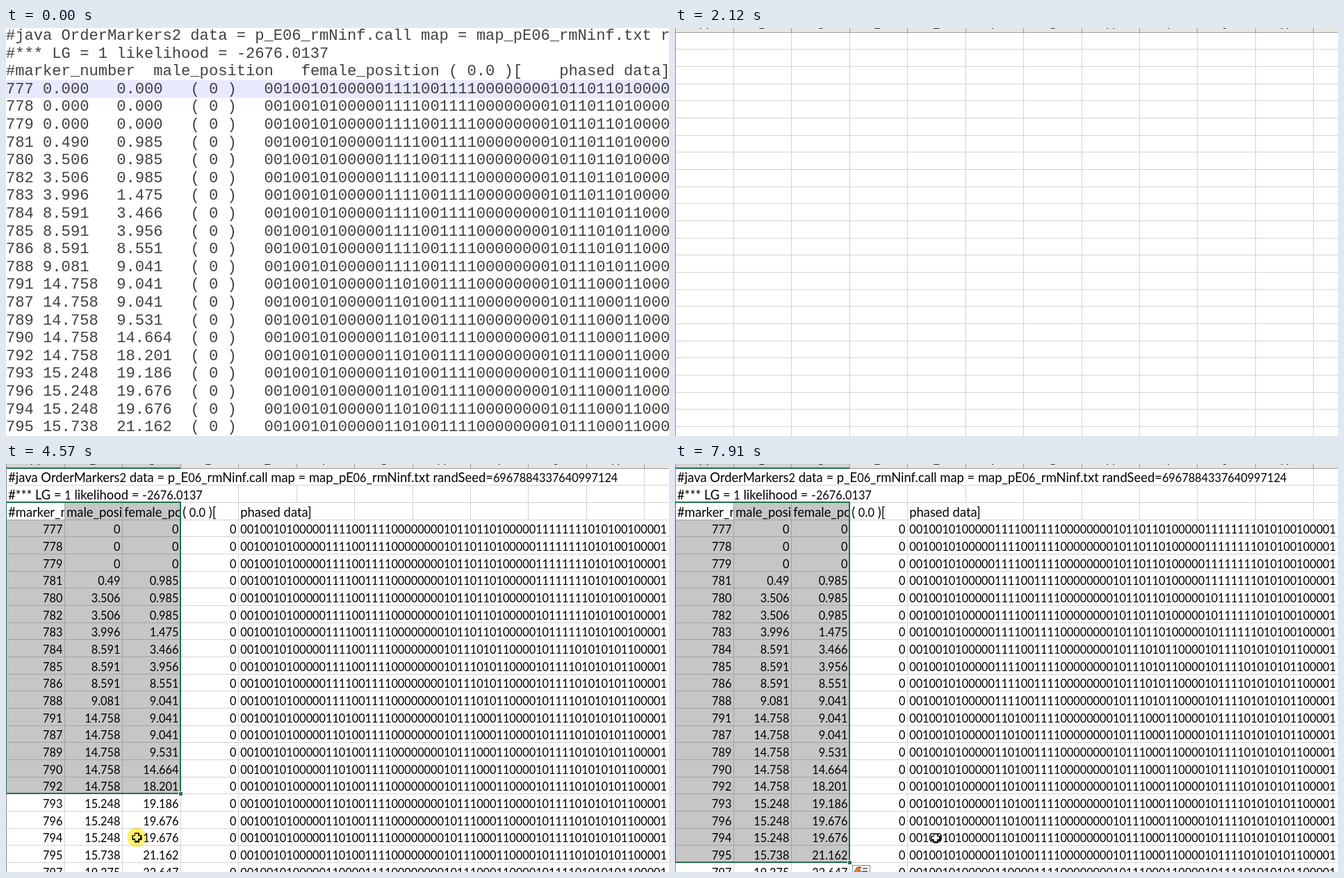
An HTML page with a canvas that plays this animation: 954x587 px, repeating every 7990 ms.

```html
<!DOCTYPE html>
<html>
<head>
<meta charset="utf-8">
<style>
html, body { margin: 0; width: 100%; height: 100%; overflow: hidden; background: #fff; }
canvas { display: block; }
</style>
</head>
<body>
<canvas id="stage" width="954" height="587"></canvas>
<script>
const W = 954, H = 587, LOOP = 7990;
const ctx = document.getElementById('stage').getContext('2d');

const COMMAND = '#java OrderMarkers2 data = p_E06_rmNinf.call map = map_pE06_rmNinf.txt randSeed=6967884337640997124';
const LIKELIHOOD = '#*** LG = 1 likelihood = -2676.0137';
const ROW_COUNT = 21;

// ---- Linkage map: ascending markers, a few of them placed early ----
const markers = Array.from({ length: ROW_COUNT }, (_, i) => 777 + i);
function placeBefore(marker, next) {
  markers.splice(markers.indexOf(marker), 1);
  markers.splice(markers.indexOf(next), 0, marker);
}
placeBefore(781, 780);
placeBefore(788, 787);
placeBefore(791, 787);
placeBefore(796, 794);

// Positions add up: one crossover at each unit row, a longer gap at the others
const CROSSOVER = 0.49;
function positions(unitRows, gaps) {
  let sum = 0;
  return markers.map((_, i) => sum += unitRows.includes(i) ? CROSSOVER : gaps[i] || 0);
}
const male = positions([3, 6, 10, 16, 19], { 4: 3.016, 7: 4.595, 11: 5.677, 20: 3.537 });
const female = positions([6, 8, 10, 13, 17],
  { 3: 0.985, 7: 1.991, 9: 4.595, 14: 5.133, 15: 3.537, 16: 0.985, 19: 1.486, 20: 1.485 });

function phase(i) {
  const head = '0010010100000' + (i < 11 ? '1111' : i < 20 ? '1101' : '1100') + '00111100000000';
  const middle = i < 7 ? '1011011010000' : i < 11 ? '1011101011000' : '1011100011000';
  const tail = i < 4 ? '011111111010100100001'
    : i < 7 ? '010111111010100100001' : '010111101010101100001';
  return head + middle + tail;
}

// ---- Helpers ----
// Linear interpolation over [time, x, y] points
function track(points, t) {
  const next = points.findIndex(p => t < p[0]);
  if (next <= 0) return points[next ? points.length - 1 : 0].slice(1);
  const [t0, x0, y0] = points[next - 1], [t1, x1, y1] = points[next];
  const k = (t - t0) / (t1 - t0);
  return [x0 + (x1 - x0) * k, y0 + (y1 - y0) * k];
}

function box(color, x, y, w, h) {
  ctx.fillStyle = color;
  ctx.fillRect(x, y, w, h);
}

function polygon(points, fill, stroke) {
  ctx.beginPath();
  points.forEach(([x, y]) => ctx.lineTo(x, y));
  ctx.closePath();
  ctx.fillStyle = fill;
  ctx.fill();
  ctx.strokeStyle = stroke;
  ctx.lineWidth = 1;
  ctx.stroke();
}

function multiply(color, shape) {
  ctx.save();
  ctx.globalCompositeOperation = 'multiply';
  ctx.fillStyle = color;
  ctx.beginPath();
  shape();
  ctx.fill('evenodd');
  ctx.restore();
}

// ---- Text editor ----
const CHAR = 13.27, LINE = 25.6;
const lineTop = i => Math.round(LINE * i - 2);

function mono(text, column, line) {
  ctx.fillText(text, column * CHAR, LINE * line + 17);
}

function drawArrow(x, y) {
  const shape = [[0, 0], [0, 16], [4, 13], [6, 18], [9, 17], [6, 12], [11, 11]];
  polygon(shape.map(([dx, dy]) => [x + dx, y + dy]), '#fff', '#222');
}

function drawEditor(t) {
  const selected = t >= 70;
  box(selected ? '#c0c0c0' : '#fff', 0, 0, W, H);
  if (selected) box('#fff', 477, lineTop(1), W, LINE - 1);
  else box('#e8e8ff', 0, lineTop(3), W, LINE);

  // a soft black stands in for thin strokes
  ctx.fillStyle = selected ? '#303030' : '#404040';
  ctx.textAlign = 'left';
  ctx.font = '22.11px "Liberation Mono", monospace';
  mono(COMMAND.slice(0, 73), 0, 0);
  mono(LIKELIHOOD, 0, 1);
  mono('#marker_number  male_position', 0, 2);
  mono('female_position ( 0.0 )[', 32, 2);
  mono('phased data]', 60, 2);
  markers.slice(0, -1).forEach((marker, i) => {
    mono(marker, 0, i + 3);
    mono(male[i].toFixed(3), 4, i + 3);
    mono(female[i].toFixed(3), 12, i + 3);
    mono('( 0 )', 20, i + 3);
    mono(phase(i).slice(0, 44), 28, i + 3);
  });
  if (selected && t < 1810) drawArrow(...track([[1100, 615, 442], [1660, 842, 586]], t));
}

// ---- Spreadsheet ----
const GREEN = '#217346', COL = 83.43, ROW = 24.66, TOP = 5.74;
const CLICK = 3150, PASTE = 3640, DRAG = 3720, RELEASE = 6400, LAG = 110;
const colX = i => i ? Math.round(0.55 + COL * i) : 0;
const rowY = i => Math.round(TOP + ROW * i);

const POINTER = [
  [2250, 700, 600], [2870, 80, 45], [3140, 42, 20], [3490, 40, 22], [3640, 46, 68],
  [3740, 158, 78], [3810, 160, 85], [4570, 188, 537], [4720, 193, 549], [5570, 194, 549],
  [5850, 193, 580], [6350, 186, 552], [7220, 173, 530], [7380, 350, 537]
];

const LETTERS = '18.4px Lato, sans-serif', DIGITS = '16.3px Lato, sans-serif';

// Digits are set smaller than letters
function label(text, x, y) {
  for (const run of text.match(/\d+|\D+/g)) {
    ctx.font = /\d/.test(run) ? DIGITS : LETTERS;
    ctx.fillText(run, x, y);
    x += ctx.measureText(run).width;
  }
}

function cellText(text, col, row, span = 1) {
  ctx.save();
  ctx.beginPath();
  ctx.rect(colX(col), rowY(row), colX(col + span) - colX(col), ROW);
  ctx.clip();
  label(text, colX(col) + 3.2, rowY(row + 1) - 4.4);
  ctx.restore();
}

function cellNumber(value, col, row) {
  ctx.font = DIGITS;
  ctx.textAlign = 'right';
  ctx.fillText(Number(value.toFixed(3)), colX(col + 1) - 2.6, rowY(row + 1) - 4.4);
  ctx.textAlign = 'left';
}

// Hides the column lines under text that spills over
function spill(row, from, to) {
  box('#fff', colX(from) + 1, rowY(row) + 1, colX(to) - colX(from) - 1, rowY(row + 1) - rowY(row) - 1);
}

// The dragged range ends at the cell the pointer was over a moment ago
function selectionAt(t) {
  if (t < CLICK) return null;
  if (t < PASTE) return { first: 0, cols: 1, end: 1 };
  if (t < DRAG) return { first: 0, cols: 13, end: 26 };
  const [x, y] = track(POINTER, Math.min(t, RELEASE) - LAG);
  return { first: 2, cols: Math.ceil(x / COL), end: Math.max(3, Math.ceil((y - TOP) / ROW)) };
}

function shadeSelection({ first, cols, end }) {
  const top = rowY(first);
  multiply('#c6c6c6', () => {
    ctx.rect(0, top, colX(cols), rowY(end) - top);
    ctx.rect(0, top, colX(1), rowY(first + 1) - top);
  });
}

function outlineSelection({ first, cols, end }) {
  const top = rowY(first), right = colX(cols), bottom = rowY(end);
  ctx.strokeStyle = GREEN;
  ctx.lineWidth = 2;
  ctx.strokeRect(0, top, right, bottom - top);
  box('#fff', right - 3, bottom - 3, 7, 7);
  box(GREEN, right - 2, bottom - 2, 5, 5);
}

function drawHeader(selection) {
  const marked = selection ? colX(selection.cols) : 0;
  box('#e6e6e6', 0, 0, W, 6);
  box('#d2d2d2', 0, 0, marked, 6);
  box('#9b9b9b', 0, 6, W, 1);
  ctx.font = LETTERS;
  ctx.textAlign = 'center';
  for (let i = 0; i < 12; i++) {
    box('#9b9b9b', colX(i), 0, 1, 6);
    ctx.fillStyle = '#222';
    ctx.fillText(String.fromCharCode(65 + i), colX(i) + COL / 2, 1);
  }
  ctx.textAlign = 'left';
  box(GREEN, 0, 5, marked, 2);
}

function clearSpills() {
  spill(0, 0, 11);
  spill(1, 0, 4);
  spill(2, 4, 6);
  markers.forEach((_, i) => spill(i + 3, 4, 12));
}

function drawData() {
  ctx.fillStyle = '#000';
  cellText(COMMAND, 0, 0, 12);
  cellText(LIKELIHOOD, 0, 1, 4);
  ['#marker_number', 'male_position', 'female_position', '( 0.0 )['].forEach((text, col) => cellText(text, col, 2));
  cellText('phased data]', 4, 2, 2);
  markers.forEach((marker, i) => {
    [marker, male[i], female[i], 0].forEach((value, col) => cellNumber(value, col, i + 3));
    cellText(phase(i), 4, i + 3, 9);
  });
}

function plus(color, x, y, reach, arm) {
  box(color, x - reach, y - arm, 2 * reach, 2 * arm);
  box(color, x - arm, y - reach, 2 * arm, 2 * reach);
}

function drawCross(x, y, pressed) {
  plus('#000', x + 0.5, y + 0.5, 7, 3.5);
  plus('#fff', x, y, 5, 2);
  if (pressed) multiply('#fff26c', () => ctx.arc(x, y, 14, 0, 7));
}

function drawQuickButton(alpha) {
  ctx.save();
  ctx.globalAlpha = alpha;
  ctx.translate(255, 577);
  box('#7d8f86', 0, 0, 26, 26);
  box('#fff', 1, 1, 24, 24);
  polygon([[7, 3], [13, 3], [9, 8], [13, 8], [5, 17], [3, 10]], '#ed7d31', '#7a4a20');
  box('#777', 15, 4, 7, 2);
  box('#777', 14, 8, 8, 2);
  ctx.restore();
}

function drawSheet(t) {
  const selection = selectionAt(t);
  const pasted = t >= PASTE;
  box('#fff', 0, 0, W, H);
  for (let i = 1; i < 12; i++) box('#d4d4d4', colX(i), 7, 1, H);
  for (let i = 1; i < 24; i++) box('#d4d4d4', 0, rowY(i), W, 1);
  if (pasted) clearSpills();
  if (selection) shadeSelection(selection);
  drawHeader(selection);
  if (pasted) drawData();
  box('#8c8c8c', 0, 0, 1, H);
  if (selection) outlineSelection(selection);
  if (t > 7150) drawQuickButton(Math.min(1, (t - 7150) / 230));

  const pressed = (t >= CLICK && t < CLICK + 150) || (t >= DRAG && t < RELEASE);
  if (t >= 7910) drawCross(375, 538, false);
  else if (t >= 2250 && t < 7440) drawCross(...track(POINTER, t), pressed);
}

function frame(now) {
  const t = now % LOOP;
  if (t < 2120) drawEditor(t);
  else drawSheet(t);
  requestAnimationFrame(frame);
}
requestAnimationFrame(frame);
</script>
</body>
</html>
```
